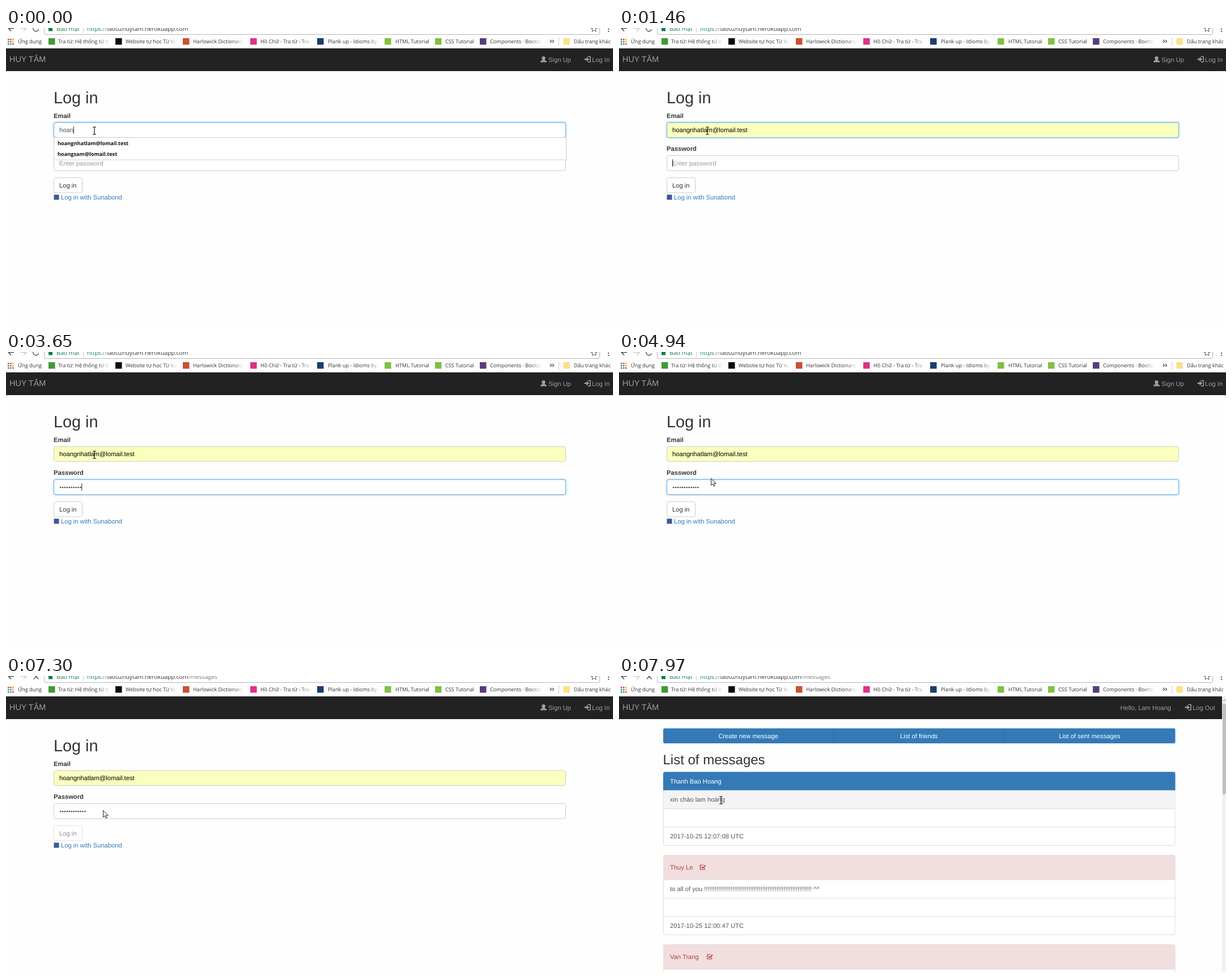
Animation of 1071x523 px, one loop 8 s. Source, as an HTML page:

```html
<!DOCTYPE html>
<html lang="vi">
<head>
<meta charset="utf-8">
<title>Log in</title>
<style>
  html, body { margin: 0; width: 100%; height: 100%; overflow: hidden; background: #fefefe; }
  #stage { display: block; width: 100vw; height: 100vh; }
  text { font: 11.2px "Liberation Sans", Arial, sans-serif; fill: #333; text-rendering: geometricPrecision; white-space: pre; }
  .ui { font: 9.2px "Open Sans", "Noto Sans", sans-serif; }
  .url { font: 10.4px "Open Sans", "Noto Sans", sans-serif; }
  .hint { font: 700 9.2px "Open Sans", "Noto Sans", sans-serif; fill: #111; }
  .bold { font-weight: 700; }
  .glow { fill: #66afe9; filter: blur(2px); }
</style>
</head>
<body>
<svg id="stage" viewBox="0 0 1071 523" xmlns="http://www.w3.org/2000/svg"></svg>
<script>
const LOOP = 8000;
const BG = '#fefefe', BLUE = '#337ab7', GREY = '#9d9d9d', RED = '#a94442';
const NAME = 'hoangnhatlam', HOST = '@lomail.test';
const DOT = 3.92;

const el = (tag, attrs, body = '') =>
  `<${tag} ${Object.entries(attrs).map(([k, v]) => `${k}="${v}"`).join(' ')}>${body}</${tag}>`;
const text = (x, y, s, attrs = {}) => el('text', { x, y, ...attrs }, s);
const rect = (x, y, width, height, fill, attrs = {}) => el('rect', { x, y, width, height, fill, ...attrs });
const path = (d, stroke, width = 1, attrs = {}) =>
  el('path', { d, stroke, 'stroke-width': width, fill: 'none', ...attrs });
const group = (id, ...items) => el('g', { id }, items.join(''));
const fill = c => ({ style: `fill:${c}` });
const sized = (px, c = '#333') => ({ style: `font-size:${px}px;fill:${c}` });

// Bookmark label, faded out at its right end when it is too long
function label(x, s, end) {
  if (!end) return text(x, 27, s, { class: 'ui' });
  const w = end - x;
  return el('svg', { x, y: 14, width: w, height: 20 },
    text(0, 13, s, { class: 'ui' }) + rect(w - 20, 0, 20, 20, 'url(#fade)'));
}

function toolbar() {
  const marks = [
    [75, '#3f9a35', 92, 'Tra từ: Hệ thống từ điển', 183],
    [193, '#0a0a0a', 211, 'Website tự học Từ Vựng', 302],
    [312, '#c8502f', 330, 'Harlowick Dictionary', 420],
    [431, '#e0308c', 449, 'Hồ Chữ - Tra từ - Tra từ', 540],
    [549, '#1c3d6e', 568, 'Plank up - Idioms by all', 659],
    [668, '#7fc142', 687, 'HTML Tutorial'],
    [757, '#7fc142', 775, 'CSS Tutorial'],
    [836, '#563d7c', 854, 'Components · Bootstrap', 945],
  ];
  const dots = ['#e0463a', '#e0463a', '#f0b429', '#3c9b50', '#4a80e0', '#f0b429', '#3c9b50', '#4a80e0', '#e0463a'];
  return rect(0, 0, 1071, 36, BG) +
    rect(67.5, -15, 980, 26.5, '#fff', { rx: 2.5, stroke: '#b5b5b5' }) +
    path('M14 .5H5M9 -4L4.500 .5L9 5.500', '#444', 1.5) +
    path('M25 .5H35M31 -4L36 .5L31 5.500', '#c9c9c9', 1.5) +
    group('reload', path('M57.500 -1A5 5 0 1 0 57.500 2.500', '#555', 1.5)) +
    group('stop', path('M49 -3.500L57.500 5.500M57.500 -3.500L49 5.500', '#555', 1.5)) +
    rect(75, -1, 7, 6.5, '#0b8043') +
    text(89, 5, 'Bảo mật', { class: 'url', ...fill('#0b8043') }) +
    path('M136.500 0V8', '#ccc') +
    el('text', { x: 143, y: 5, class: 'url' },
      '<tspan fill="#0b8043">https</tspan><tspan fill="#777">://</tspan>lab02huytam.herokuapp.com' +
      '<tspan id="route" fill="#777">/messages</tspan>') +
    path('M1037.500 -4L1039 .2L1043 .2L1040 2.600L1041 6.300L1037.500 4L1034 6.300L1035 2.600L1032 .2L1036 .2Z', '#555') +
    rect(1062, 1, 2, 2, '#555') + rect(1062, 5, 2, 2, '#555') +
    dots.map((c, i) => rect(3 + i % 3 * 4, 19 + (i / 3 | 0) * 4, 2.6, 2.6, c)).join('') +
    label(21, 'Ứng dụng') +
    marks.map(([x, c, tx, s, end]) => rect(x, 18, 11.5, 11.5, c) + label(tx, s, end)).join('') +
    path('M960 21l2.500 2.500l-2.500 2.500M964 21l2.500 2.500l-2.500 2.500', '#444', 1.2) +
    path('M975.500 17V31', '#ccc') +
    rect(984, 18.5, 10, 10.5, '#ffe083', { stroke: '#f3d06a', 'stroke-width': .6 }) +
    label(1002, 'Dấu trang khác');
}

const doorIcon = x =>
  path(`M${x + 6} 50.500H${x + 10.5}V60H${x + 6}`, GREY, 1.6) +
  el('path', { d: `M${x} 54H${x + 4}V51L${x + 8.5} 55.300L${x + 4} 59.500V56.500H${x}Z`, fill: GREY });

const checkIcon = (x, y) =>
  path(`M${x + 8.5} ${y + 6}V${y + 9.5}H${x + .8}V${y + 1.5}H${x + 7}`, RED, 1.2) +
  path(`M${x + 2.8} ${y + 4.5}l2.300 2.500l5 -5.200`, RED, 1.7);

function field(id, y) {
  const box = { rx: 3.2, 'stroke-width': 1 };
  return rect(84, y - .5, 904, 27.5, '', { class: 'glow', id: id + 'Glow', rx: 3 }) +
    rect(84.5, y, 903, 26.5, '#fff', { id: id + 'Box', stroke: '#ccc', ...box }) +
    rect(84.5, y, 903, 26.5, 'none', { id: id + 'Ring', stroke: '#66afe9', ...box });
}

function loginPage() {
  return group('login',
    el('path', { d: 'M943 60.500V59Q943.500 57.500 946.800 56.500Q945 54.500 945.300 52.500Q945.600 50 948.500 50Q951.400 50 951.700 52.500Q952 54.500 950.200 56.500Q953.500 57.500 954 59V60.500Z', fill: GREY }),
    text(957, 59.5, 'Sign Up', fill(GREY)),
    doorIcon(1020.5), text(1034, 59.5, 'Log In', fill(GREY)),
    text(84, 133, 'Log in', sized(28.8)),
    text(84, 158.7, 'Email', { class: 'bold' }),
    text(84, 217.3, 'Password', { class: 'bold' }),
    field('mail', 167), text(94, 184.2, '', { id: 'mailText' }),
    rect(0, 174, 1, 13, '#222', { id: 'mailCaret' }),
    field('pass', 225.5), text(94, 242.8, 'Enter password', { id: 'empty', ...fill('#999') }),
    group('dots', ...Array.from({ length: 12 }, (_, i) =>
      el('circle', { cx: 96.2 + i * DOT, cy: 239.2, r: 1.25, fill: '#444' }))),
    rect(0, 232, 1, 13, '#222', { id: 'passCaret' }),
    group('button',
      rect(84.5, 264.5, 50, 26.5, '#fff', { id: 'buttonBox', rx: 3.2, stroke: '#ccc' }),
      text(94, 282, 'Log in')),
    rect(84.5, 294.5, 9, 9, '#3b5998'),
    text(97, 303.3, 'Log in with Sunabond', fill(BLUE)),
    group('list',
      rect(84.5, 193.5, 904, 0, '#fff', { id: 'listBox', stroke: '#ccc' }),
      rect(84, 194, 905, 20, '#bddbf4', { id: 'pick' }),
      text(91, 207, NAME + HOST, { class: 'hint' }),
      text(91, 226.3, 'hoangsam' + HOST, { class: 'hint', id: 'second' })));
}

// Panel: header of height h, then three rows
function panel(y, h, name, msg, time, unread) {
  const rowY = i => y + h + i * 32.4;
  const head = unread ? '#f2dede' : BLUE;
  return rect(78.5, y, 902.5, h + 97.2, '#fff', { rx: 3, stroke: '#ddd' }) +
    el('path', { d: `M78 ${y + h}V${y + 3}q0 -3 3 -3H978.500q3 0 3 3V${y + h}Z`, fill: head }) +
    (unread ? '' : rect(79, y + h, 902, 32.4, '#f4f4f4')) +
    [0, 1, 2].map(i => path(`M78 ${rowY(i)}H981.500`, '#ddd')).join('') +
    text(90, y + h / 2 + 4, name, fill(unread ? RED : '#fff')) +
    text(90, rowY(0) + 20, msg, fill('#555')) +
    text(90, rowY(2) + 20, time, fill('#555'));
}

function messagesPage() {
  const tabs = ['Create new message', 'List of friends', 'List of sent messages'];
  return group('messages',
    text(974, 59.5, 'Hello, Lam Hoang', { 'text-anchor': 'end', ...fill(GREY) }),
    doorIcon(998.5), text(1012, 59.5, 'Log Out', fill(GREY)),
    rect(1064, 36, 7, 487, '#f1f1f1'),
    rect(1065, 49, 6, 160, '#c1c1c1'),
    path('M1066 44l2.500 -2.500l2.500 2.500', '#777'),
    rect(78, 92.5, 903.5, 26.5, BLUE, { rx: 3 }),
    path('M379 93V119M680.500 93V119', '#2e6da4'),
    ...tabs.map((s, i) => text(228 + i * 301.2, 109.5, s, { 'text-anchor': 'middle', ...fill('#fff') })),
    text(77.5, 156, 'List of messages', sized(24)),
    panel(169.5, 32.7, 'Thanh Bao Hoang', 'xin chào lam hoàng', '2017-10-25 12:07:08 UTC'),
    panel(316.5, 43.5, 'Thuy Le', 'to all of you ' + '!'.repeat(61) + ' ^^', '2017-10-25 12:00:47 UTC', true),
    checkIcon(142.5, 332.5),
    panel(474.5, 43.5, 'Van Trang', '', '', true),
    checkIcon(155, 490.5));
}

const cursors =
  group('beam', path('M-3 -6.500H-1Q0 -6.500 0 -5.500Q0 -6.500 1 -6.500H3M0 -5.500V5.500M-3 6.500H-1Q0 6.500 0 5.500Q0 6.500 1 6.500H3', '#111', 1.2)) +
  group('arrow', path('M.5 .5V12.500L3.300 9.800L5.200 14.200L7.200 13.300L5.300 9.200H9.200Z', '#222', 1, { style: 'fill:#fff' })) +
  group('hand', path('M3.500 8V1.500Q4.500 0 5.500 1.500V6Q6.500 5 7.500 6.300Q8.500 5.500 9.500 6.800Q10.800 6.300 11 8V11Q10.500 13 10 15H4.500Q3 11.500 .8 9Q1 7 3.500 9Z', '#222', 1, { style: 'fill:#fff' }));

document.getElementById('stage').innerHTML =
  `<defs><linearGradient id="fade"><stop stop-color="${BG}" stop-opacity="0"/><stop offset="1" stop-color="${BG}"/></linearGradient></defs>` +
  rect(0, 0, 1071, 523, BG) +
  rect(0, 35.5, 1071, 40.5, '#222') + rect(0, 75.2, 1071, .9, '#080808') +
  text(6, 60.3, 'HUY TÂM', sized(14.4, GREY)) +
  loginPage() + messagesPage() + toolbar() + cursors;

const ui = {};
document.querySelectorAll('[id]').forEach(n => ui[n.id] = n);
const set = (id, attrs) => Object.entries(attrs).forEach(([k, v]) => ui[id].setAttribute(k, v));
const show = (id, on) => set(id, { display: on ? 'inline' : 'none' });

// Last entry of [time, ...values] that has begun
const at = (steps, t) => steps.filter(s => s[0] <= t).pop();
const value = (steps, t) => at(steps, t)[1];

const TYPED = [[0, 4], [150, 5], [290, 6], [420, 8]];
const KEYS = [...Array.from({ length: 8 }, (_, i) => 2380 + i * 139), 3500, 3650, 3930, 4080];
const MAIL_RING = [[0, 1], [1580, .25], [1700, 0]];
const PASS_RING = [[0, 0], [1580, .75], [1700, 1], [5460, .8], [5610, .15], [5750, 0]];
const PASS_CARET = [[0, 0], [1460, 1], [1980, 0], [2380, 1], [4510, 0], [5090, 1], [5460, 0]];
const BUTTON = [[0, '#fff', '#ccc'], [5340, '#e6e6e6', '#adadad'], [5460, '#d4d4d4', '#8c8c8c'], [5610, '#fff', '#ccc']];
const POINTER = [
  [0, 156, 181.5, 'beam'], [4660, 159, 205, 'arrow'], [4940, 162, 223, 'arrow'],
  [5090, 158, 238, 'beam'], [5210, 146, 254, 'arrow'], [5340, 124, 268, 'hand'],
  [5460, 118, 267, 'hand'], [6190, 136, 269, 'arrow'], [6310, 150, 272, 'arrow'],
  [6900, 158, 261, 'arrow'], [7020, 166, 248, 'arrow'], [7150, 170, 240, 'arrow'],
  [7300, 171, 237, 'arrow'], [7450, 173, 237, 'arrow'], [7850, 175, 228, 'arrow'],
  [7970, 180, 219.5, 'beam'],
];

function ring(id, strength) {
  set(id + 'Glow', { opacity: strength * .6 });
  set(id + 'Ring', { opacity: strength });
}

function draw(t) {
  const loading = t >= 5610, done = t >= 7450;
  show('login', !done);
  show('messages', done);
  show('reload', !loading);
  show('stop', loading);
  show('route', t >= 7150);

  const typed = value(TYPED, t), filled = t >= 1160;
  ui.mailText.textContent = filled ? NAME + HOST : NAME.slice(0, typed);
  ui.mailText.style.fill = filled ? '#000' : '#555';
  set('mailBox', { fill: filled ? '#faffbd' : '#fff' });
  show('mailCaret', t < 1010);
  if (t < 1010) set('mailCaret', { x: 94 + ui.mailText.getComputedTextLength() });
  show('list', t < 1460);
  show('second', typed < 6);
  set('listBox', { height: typed < 6 ? 39.5 : 20.5 });
  show('pick', t >= 1010);
  ring('mail', value(MAIL_RING, t));

  const count = KEYS.filter(k => k <= t).length;
  show('empty', !count);
  [...ui.dots.children].forEach((d, i) => d.setAttribute('opacity', i < count ? 1 : 0));
  set('passCaret', { x: 94 + count * DOT });
  show('passCaret', value(PASS_CARET, t));
  ring('pass', value(PASS_RING, t));

  const [, face, edge] = at(BUTTON, t);
  set('buttonBox', { fill: face, stroke: edge });
  set('button', { opacity: loading ? .55 : 1 });

  const [, x, y, shape] = at(POINTER, t);
  for (const id of ['beam', 'arrow', 'hand']) show(id, id === shape);
  set(shape, { transform: `translate(${x} ${y})` });
}

function tick() {
  draw(performance.now() % LOOP);
  requestAnimationFrame(tick);
}
tick();
</script>
</body>
</html>
```
